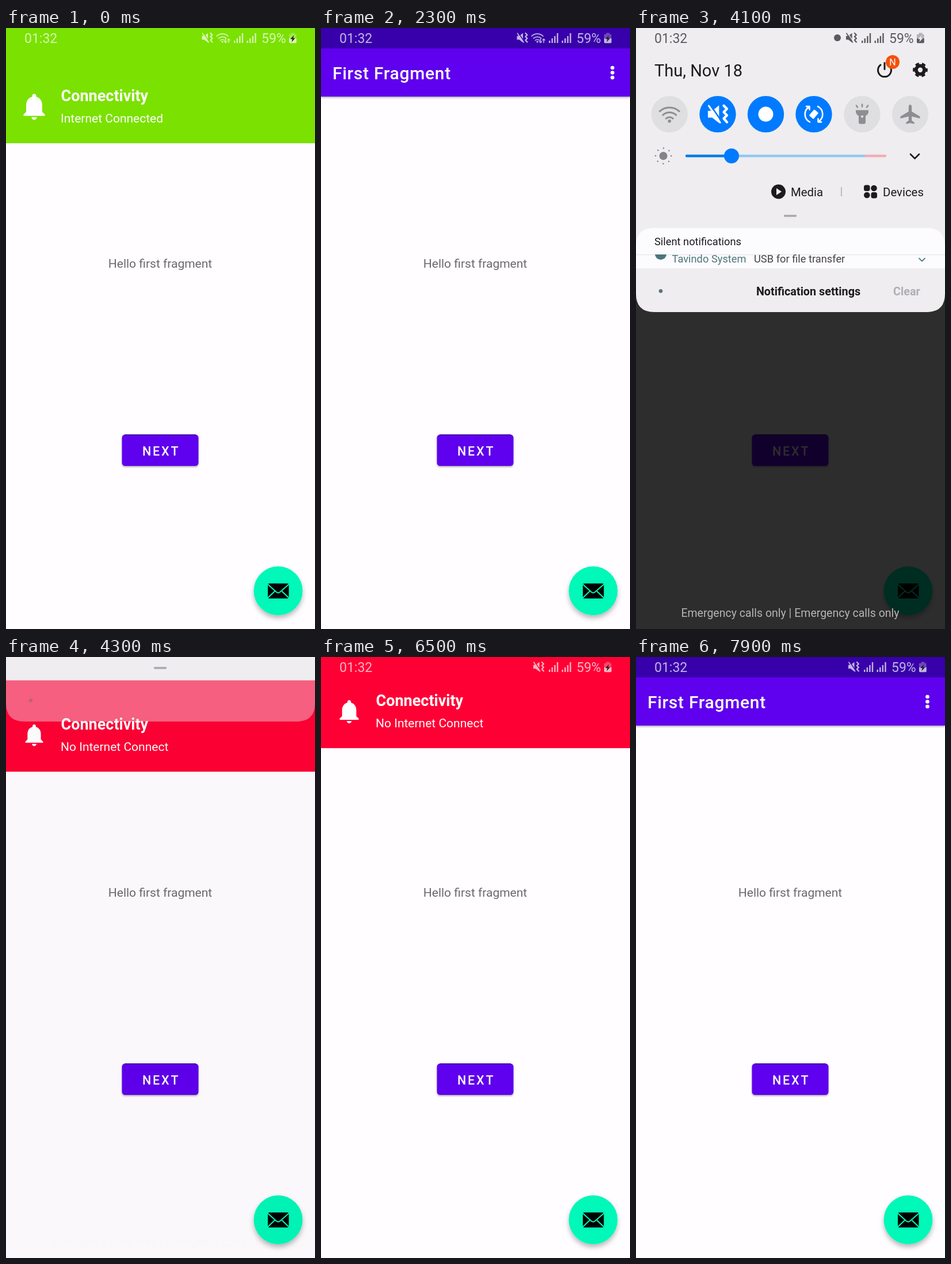
An HTML page that plays this animation: 537 px wide and 1043 px high, repeating every 8000 ms.

```html
<!DOCTYPE html>
<html lang="en">
<head>
<meta charset="utf-8">
<title>Connectivity alert</title>
<style>
  html, body { margin: 0; width: 100%; height: 100%; overflow: hidden; background: #fffdff; }
  svg { display: block; width: 537px; height: 1043px; font-family: Roboto, "Noto Sans", sans-serif; }
  .mid { text-anchor: middle; }
  .medium { font-weight: 500; }
  .bold { font-weight: 700; }
  .line { fill: none; stroke: currentColor; stroke-linecap: round; stroke-linejoin: round; }
  .row { font-size: 18.3px; }
  .app { fill: #4b767c; }
</style>
</head>
<body>
<svg viewBox="0 0 537 1043">
  <defs>
    <filter id="soft" x="-30%" y="-30%" width="160%" height="170%">
      <feDropShadow dx="0" dy="5" stdDeviation="4.5" flood-opacity=".28"/>
    </filter>
    <filter id="low" x="-10%" y="-20%" width="120%" height="150%">
      <feDropShadow dx="0" dy="2" stdDeviation="1.6" flood-opacity=".3"/>
    </filter>
    <mask id="cut" maskUnits="userSpaceOnUse" x="-12" y="-12" width="24" height="24">
      <rect x="-12" y="-12" width="24" height="24" fill="#fff"/>
      <path d="M-7.5-9 4 7.5" stroke="#000" stroke-width="1.4"/>
    </mask>
    <clipPath id="clip1"><rect id="view1" x="0" y="393" width="537" height="68"/></clipPath>
    <clipPath id="clip2"><rect id="view2" x="0" y="461" width="537" height="68"/></clipPath>

    <g id="mute">
      <path d="M-9.5-3.2h4L1-8.300V8.300L-5.5 3.200h-4z" fill="currentColor" mask="url(#cut)"/>
      <path class="line" stroke-width="1.7" d="M-8.6-7.8 2 7.8"/>
      <path class="line" stroke-width="2.3" d="M5.4-8 8.4-5 5.4-2 8.4 1 5.4 4 8.4 7.4"/>
    </g>
    <g id="wifi">
      <path class="line" stroke-width="3" d="M-17-5A25 25 0 0 1 17-5M-11.5 1.5A17 17 0 0 1 11.5 1.5M-6 7.5A9 9 0 0 1 6 7.5"/>
      <circle cy="12" r="2.8" fill="currentColor"/>
    </g>
    <g id="bars" fill="currentColor">
      <path d="M0 22h2.4v4H0zM4.6 18H7v8H4.6zM9.2 14h2.4v12H9.2zM13.8 9h2.4v17h-2.4z"/>
    </g>
    <g id="system" fill="currentColor">
      <use href="#bars" x="396"/>
      <use href="#bars" x="418.5"/>
      <text x="444" y="26" font-size="23">59%</text>
      <path d="M495.5 8.5h6v2.5h3v7.5H492V11h3.5z" opacity=".4"/>
      <path d="M492 18h12.8v6.5q0 1.7-1.7 1.7h-9.4q-1.7 0-1.7-1.7z"/>
    </g>
    <path id="bolt" d="M500.5 12.5 494 19.2h3.6l-1.2 5.3 6.2-7h-3.6z"/>
    <path id="netArrows" class="line" stroke-width="1.5" d="M381.5 19v6.5m-2-2 2 2 2-2M387 25.5V19m-2 2 2-2 2 2"/>
    <path id="chevron" class="line" stroke-width="1.8" d="M-5-2 0 3 5-2"/>
  </defs>

  <rect width="537" height="1043" fill="#fffdff"/>
  <text class="mid" x="268" y="416" font-size="21" fill="#6b696d">Hello first fragment</text>
  <rect x="201.5" y="705.5" width="133" height="54.5" rx="5.5" fill="#5f00ee" filter="url(#low)"/>
  <path d="M206 706.2h124" stroke="#2f0080" stroke-width="1.3"/>
  <text class="medium" x="237" y="741.5" font-size="21.5" letter-spacing="2.8" fill="#fff">NEXT</text>
  <circle cx="473" cy="976.7" r="42.5" fill="#00f8b8" filter="url(#soft)"/>
  <rect x="455" y="964" width="36.5" height="26" rx="2.5"/>
  <path d="M455 965.5 470 979q3 2.4 6 0l15.5-13.5M455 989l12-11.5M491.5 989l-12-11.5" fill="none" stroke="#00f8b8" stroke-width="2"/>

  <rect y="-10" width="537" height="129" fill="#5f00ee" filter="url(#low)"/>
  <rect width="537" height="35.5" fill="#3800aa"/>
  <text class="medium" x="20" y="89" font-size="30" letter-spacing=".7" fill="#fff">First Fragment</text>
  <g fill="#fff"><circle cx="506.5" cy="69" r="3.3"/><circle cx="506.5" cy="77.5" r="3.3"/><circle cx="506.5" cy="86" r="3.3"/></g>

  <g id="alert" fill="#fff">
    <rect id="alertBox" y="-200" width="537" height="400"/>
    <path id="bell" d="M12 22c1.1 0 2-.9 2-2h-4c0 1.1.89 2 2 2zm6-6v-5c0-3.07-1.64-5.64-4.5-6.32V4c0-.83-.67-1.5-1.5-1.5s-1.5.67-1.5 1.5v.68C7.63 5.36 6 7.92 6 11v5l-2 2v1h16v-1l-2-2z"/>
    <text class="bold" x="95.5" y="127" font-size="27">Connectivity</text>
    <text id="alertText" x="95" y="164" font-size="21"></text>
  </g>

  <g color="#fff" opacity=".7">
    <text x="32" y="26" font-size="23" fill="#fff">01:32</text>
    <use href="#system"/>
    <use id="appMute" href="#mute"/>
    <g id="appWifi"><use href="#wifi" transform="translate(376 17) scale(.58)"/><use href="#netArrows"/></g>
  </g>
  <use href="#bolt" fill="#222"/>

  <rect id="scrim" width="537" height="1043"/>
  <text id="calls" class="mid" x="268" y="1022" font-size="19.5" fill="#b5b3b6">Emergency calls only | Emergency calls only</text>

  <g id="panel">
    <path id="sheet" fill="#efedf0"/>
    <rect y="-100" width="537" height="447.5" fill="#efedf0"/>
    <path id="card" fill="#fcfbfe"/>

    <g color="#5c5a5e" fill="#5c5a5e">
      <text x="32" y="26" font-size="23">01:32</text>
      <g transform="translate(-4)">
        <use href="#system"/>
        <use href="#bolt" fill="#efedf0"/>
        <use id="panelMute" href="#mute"/>
        <g id="panelWifi"><use href="#wifi" transform="translate(376 17) scale(.58)"/><use href="#netArrows"/></g>
      </g>
      <circle id="link" cy="17" r="6"/>
    </g>

    <text x="32" y="84" font-size="29" fill="#1c1b1e">Thu, Nov 18</text>
    <g color="#1c1b1e">
      <path class="line" stroke-width="3" d="M425 64A11.5 11.5 0 1 0 439 64M432 60.5v11"/>
      <circle cx="446" cy="59" r="12" fill="#f4510b"/>
      <text class="mid" x="446" y="65" font-size="16" fill="#fff">N</text>
      <circle cx="494" cy="72.7" r="7.2" fill="none" stroke="currentColor" stroke-width="6"/>
      <circle cx="494" cy="72.7" r="10.6" fill="none" stroke="currentColor" stroke-width="4.5" stroke-dasharray="6.1 5" stroke-dashoffset="3"/>
    </g>

    <g id="toggles"></g>
    <g transform="translate(58.2 149.6)">
      <use href="#wifi" color="#8f8d91"/>
      <g id="wifiOn"><circle r="31.7" fill="#007aff"/><use href="#wifi" color="#fff"/></g>
    </g>
    <use href="#mute" transform="translate(142.5 149.6) scale(1.85)" color="#fff"/>
    <circle cx="225.5" cy="149.6" r="13" fill="#fff"/>
    <g transform="translate(309 149.6)" color="#fff">
      <path class="line" stroke-width="2.6" d="M-7 13.5A15 15 0 0 1-8-12.8M7-13.5A15 15 0 0 1 8 12.8M-13-13.5h5.5v5.5M13 13.5H7.5V8"/>
      <rect x="-5" y="-7" width="10" height="14" rx="1.5" fill="#fff" transform="rotate(40)"/>
    </g>
    <g transform="translate(393 149.6)" fill="#8f8d91" color="#8f8d91">
      <path d="M-11-7h22v3q0 4-5 7v11q0 3-3 3h-6q-3 0-3-3V3q-5-3-5-7z"/>
      <path class="line" stroke-width="2.6" d="M0-17v4M-10-15l2 3M10-15l-2 3"/>
      <circle cy="4" r="2.2" fill="#dfdee0"/>
    </g>
    <path transform="translate(476.5 149.6)" fill="#8f8d91" d="M0-16.5q2.7 0 2.7 5v7L17 4v3.5L2.7 4v7l4.5 3.5V17L0 15.3-7.2 17v-2.5L-2.7 11V4L-17 7.5V4L-2.7-4.5v-7q0-5 2.7-5z"/>

    <circle cx="47.5" cy="222" r="7" fill="#858387"/>
    <circle cx="47.5" cy="222" r="13.5" class="line" color="#858387" stroke-width="2.6" stroke-dasharray=".01 10.593"/>
    <g fill="none" stroke-width="4.4" stroke-linecap="round">
      <path d="M399 222h34" stroke="#f2aeb8"/>
      <path d="M88 222h310" stroke="#92c8ef" stroke-linecap="butt"/>
      <path d="M88 222h78" stroke="#007ee6"/>
    </g>
    <circle cx="166" cy="222" r="13" fill="#007aff"/>
    <use href="#chevron" transform="translate(484.5 222) scale(1.5)" color="#1c1b1e"/>

    <g fill="#1c1b1e" font-size="20.4">
      <circle cx="247.5" cy="284" r="12.5"/>
      <path d="M244 278v12l9-6z" fill="#efedf0"/>
      <text x="269" y="292">Media</text>
      <path d="M357 276v16" stroke="#aaa8ac" stroke-width="1.5"/>
      <rect x="396" y="272.5" width="10.5" height="10.5" rx="3.5"/>
      <circle cx="413.5" cy="278" r="5.3"/><circle cx="401.3" cy="290" r="5.3"/>
      <rect x="408.5" y="285" width="10.5" height="10.5" rx="3.5"/>
      <text x="429" y="292">Devices</text>
    </g>
    <path d="M258.5 326h19" stroke="#a9a7ab" stroke-width="3.5" stroke-linecap="round"/>

    <g id="list" class="row" fill="#454347">
      <text x="32" y="377" fill="#1c1b1e">Silent notifications</text>
      <path d="M0 393.5h537" stroke="#e9e7eb" stroke-width="1.5"/>
      <g clip-path="url(#clip1)">
        <g id="row1">
          <circle id="icon1" class="app" cx="43" cy="427.5" r="10"/>
          <text class="app" x="62.5" y="434">Tavindo System</text>
          <text x="205" y="434">USB for file transfer</text>
          <use href="#chevron" x="497" y="429" color="#4b767c"/>
        </g>
      </g>
      <g clip-path="url(#clip2)">
        <path d="M0 461.5h537" stroke="#e9e7eb" stroke-width="1.5"/>
        <g id="row2">
          <path class="app" d="M40 486h8.5l-3 6.5h4.5L39.5 505l2.5-9h-5z"/>
          <text class="app" x="62.5" y="502">Settings</text>
          <text x="143" y="502">Cable charging</text>
          <use href="#chevron" x="497" y="497" color="#4b767c"/>
        </g>
      </g>
    </g>
    <g id="footer" class="bold" font-size="19.8">
      <text class="mid" x="299.5" y="7" fill="#1c1b1e">Notification settings</text>
      <text x="447" y="7" fill="#b0aeb2">Clear</text>
    </g>
    <circle id="more" cx="43" r="3.3" fill="#5b7178"/>
  </g>
</svg>

<script>
const $ = id => document.getElementById(id);
const set = (id, attrs) => { for (const k in attrs) $(id).setAttribute(k, attrs[k]); };
const clamp = (v, lo = 0, hi = 1) => Math.min(hi, Math.max(lo, v));
const LOOP = 8000, STEP = 100;

$('toggles').innerHTML = [58.2, 142, 225.5, 309, 393, 476.5].map((x, i) =>
  `<circle cx="${x}" cy="149.6" r="31.7" fill="${i > 0 && i < 4 ? '#007aff' : '#dfdee0'}"/>`).join('');

// Linear interpolation through [time, value] points.
function track(t, points) {
  if (t <= points[0][0]) return points[0][1];
  for (let i = 1; i < points.length; i++) {
    const [t0, v0] = points[i - 1], [t1, v1] = points[i];
    if (t < t1) return v0 + (v1 - v0) * (t - t0) / (t1 - t0);
  }
  return points[points.length - 1][1];
}

const ease = (t, start, length) => (1 - Math.cos(Math.PI * clamp((t - start) / length))) / 2;

// Full-width box with separate top and bottom corner radii.
function box(top, bottom, rt, rb) {
  return `M0 ${top + rt}Q0 ${top} ${rt} ${top}H${537 - rt}Q537 ${top} 537 ${top + rt}` +
    `V${bottom - rb}Q537 ${bottom} ${537 - rb} ${bottom}H${rb}Q0 ${bottom} 0 ${bottom - rb}Z`;
}

function drawAlert(t) {
  const online = t < 3000;
  const away = online ? ease(t, 230, 430) : 1 - ease(t, 3300, 400) + ease(t, 6375, 430);
  const beat = Math.cos(2 * Math.PI * (online ? t : t - 3800) / 1000);
  const size = 2.125 * (1 + .09 * beat);
  set('alert', { transform: `translate(0 ${-210 * away - (online ? 0 : 1)})` });
  set('alertBox', { fill: online ? '#7be100' : '#ff0034' });
  set('bell', { transform: `translate(49 136.8) scale(${size}) translate(-12 -12.25)` });
  $('alertText').textContent = online ? 'Internet Connected' : 'No Internet Connect';
}

function drawStatus(t) {
  const wifi = t < 3280;
  const mute = { transform: `translate(${wifi ? 350 : 378.5} 17)` };
  const show = { visibility: wifi ? 'visible' : 'hidden' };
  set('appMute', mute);
  set('panelMute', mute);
  set('appWifi', show);
  set('panelWifi', show);
  set('link', { cx: wifi ? 321 : 350 });
  set('wifiOn', { opacity: track(t, [[3150, 1], [3350, 0]]) });
}

function drawPanel(t) {
  const edge = track(t, [[2310, 0], [2400, 330], [2500, 574], [2600, 605],
    [4020, 605], [4100, 493], [4200, 360], [4300, 112], [4370, 0]]);
  const dim = clamp((edge - 105) / 300);
  set('scrim', { opacity: .82 * dim });
  set('calls', { opacity: dim });
  set('panel', { display: edge > 0 ? 'inline' : 'none' });
  if (edge <= 0) return;

  const shift = Math.min(0, edge - 419);
  const bottom = edge - shift;
  const cardEnd = bottom - 76;
  const fade = clamp(.4 + .6 * (edge - 112) / 307);
  set('panel', { transform: `translate(0 ${shift})` });
  set('sheet', { d: box(347, bottom, 0, 32), opacity: fade });

  const display = cardEnd > 347 ? 'inline' : 'none';
  set('list', { display });
  set('card', {
    display,
    d: box(347, cardEnd, clamp(cardEnd - 347, 0, 32), clamp((bottom - 493) * .4, 0, 30))
  });
  [393, 461].forEach((top, i) => {
    const h = clamp(cardEnd - top, 0, 68);
    set(`view${i + 1}`, { height: h });
    set(`row${i + 1}`, { transform: `translate(0 ${(h - 68) * .62})` });
    if (!i) set('icon1', { transform: `translate(0 ${Math.min(0, h - 34) * .8})` });
  });

  const shown = track(t, [[2495, 0], [2650, 1]]);
  set('footer', { transform: `translate(0 ${cardEnd + 39.5})`, opacity: shown * clamp((edge - 300) / 120) });
  set('more', { cy: bottom - 36.5, opacity: cardEnd < 461 ? fade : 0 });
}

function frame() {
  const t = Math.floor(performance.now() % LOOP / STEP) * STEP;
  drawAlert(t);
  drawStatus(t);
  drawPanel(t);
  requestAnimationFrame(frame);
}
frame();
</script>
</body>
</html>
```
